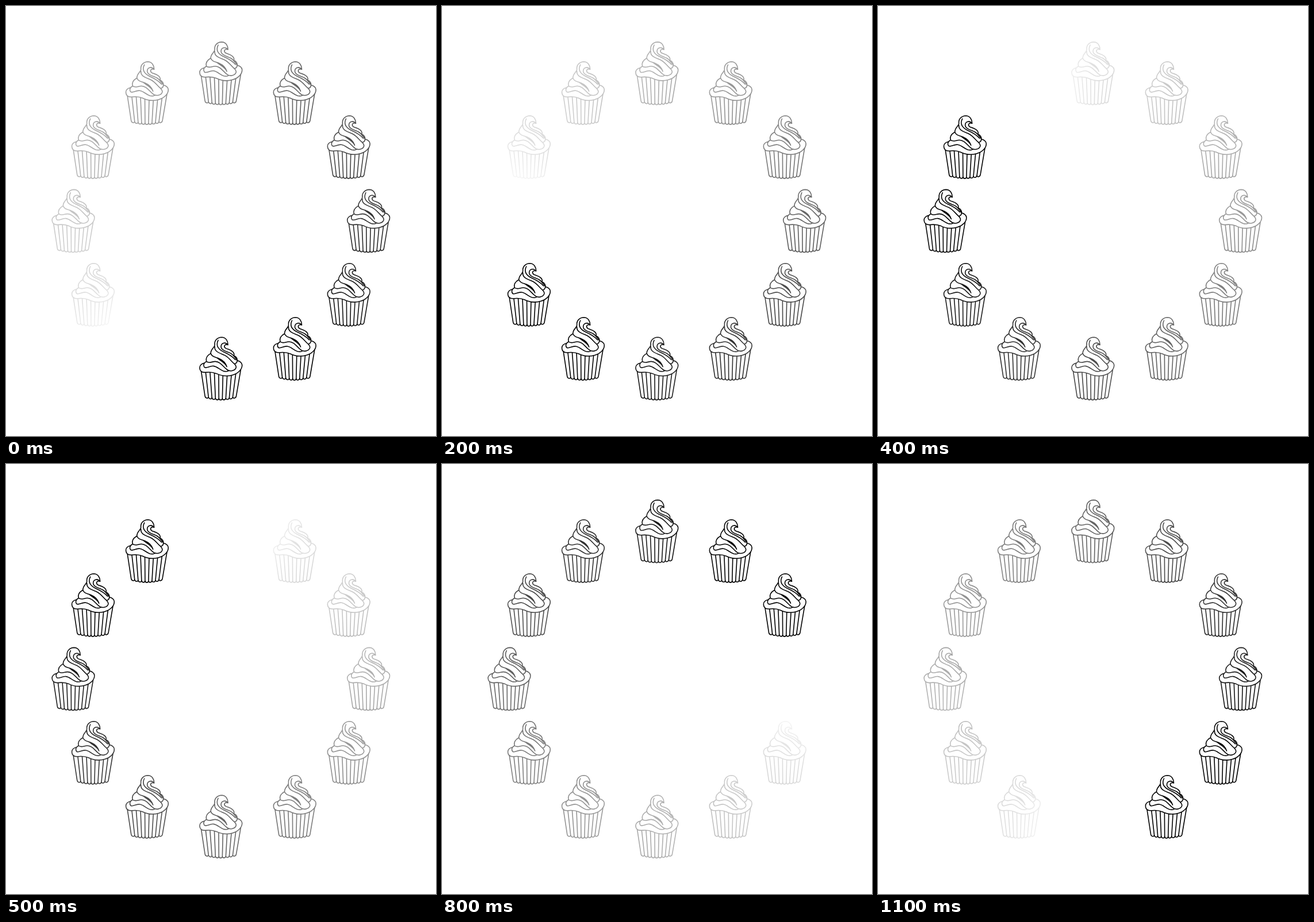
Animation of 748 by 748 pixels, one loop 1200 ms. Source, as an HTML page with a canvas:

```html
<!DOCTYPE html>
<html lang="en">
<head>
<meta charset="utf-8">
<title>Cupcake spinner</title>
<style>
  html, body { margin: 0; width: 100%; height: 100%; overflow: hidden; background: #fff; }
  canvas { display: block; }
</style>
</head>
<body>
<canvas id="stage" width="748" height="748"></canvas>
<script>
const ctx = document.getElementById('stage').getContext('2d');
const COUNT = 12, STEP_MS = 100, RADIUS = 256.8;
const CENTER = { x: 373.6, y: 373.6 };
const CAKE = { w: 75, h: 110 };

// Paper cup: slanted ribs joined by a scalloped hem.
function makeCup() {
  const cup = new Path2D(), ribs = 9;
  const hem = k => [10 + k * 6.05, 103 + 4 * Math.sin(Math.PI * k / ribs)];
  for (let k = 0; k <= ribs; k++) {
    const [x, y] = hem(k);
    cup.moveTo(3 + k * 7.7, 57);
    cup.lineTo(x, y);
    if (k < ribs) {
      const [nx, ny] = hem(k + 1);
      cup.bezierCurveTo(x + 0.5, y + 4, nx - 0.5, ny + 4, nx, ny);
    }
  }
  return cup;
}

const cup = makeCup();
const rim = new Path2D('M8 46C4 47 0.7 50 0.8 54C1 59 4 62 10 62C18 61 23 61 30 64C38 68 49 69 58 66.5C67 64 75 57 74.6 49C74.4 45 70 42 66 41.5');
const swirl = new Path2D([
  // silhouette: crest, left folds, right edge
  'M50 14C50 8 47 1 39 0.8C31 1 26 7 27 14C27 19 20 21 20 29C13 33 11 38 12.5 43C7 46 7 50 9 53',
  'M57 25C60 27 61 30 60.5 33C64 34 67 38 66 42C66 45 63 47 61 47',
  // curl at the tip
  'M50 14C45 8 38 11 38 17C38 24 50 26 55 29C60 32 63 37 66 41',
  'M50 14C44 12 42 17 46 20C50 22 54 22 57 25',
  // folds sweeping to the right
  'M33 6C28 16 34 22 42 26C51 30 58 34 63 40',
  'M27 17C26 26 35 28 44 32C52 36 55 42 61 47',
  'M20 29C23 36 29 35 35 38C42 41 46 46 48 52',
  'M12.5 43C17 47 22 43 28 43C36 43 41 51 47 56C53 62 62 59 64 54C65 51 63 49 61 47',
  'M9 53C13 56 18 50 25 51C32 52 36 58 43 60C48 61 50 60 51 59'
].join(''));
const shadow = new Path2D('M30 37C38 38 47 44 48.5 53C44 46 37 42 30 37Z');

// Ink fades around the ring behind the leading cupcake.
function ringInk(head, left, top) {
  const turn = 2 * Math.PI / COUNT;
  const ink = ctx.createConicGradient((head + 0.5) * turn - Math.PI / 2, CENTER.x - left, CENTER.y - top);
  const stop = (age, alpha) => {
    const v = Math.round(255 * (1 - alpha));
    ink.addColorStop((11.5 - age) / COUNT, `rgb(${v},${v},${v})`);
  };
  stop(11.5, 0);
  stop(10.6, 0);
  stop(10, 0.12);
  stop(1, 1);
  stop(-0.5, 1);
  return ink;
}

function drawCupcake(slot, head) {
  const angle = slot * 2 * Math.PI / COUNT;
  const left = CENTER.x + RADIUS * Math.sin(angle) - CAKE.w / 2;
  const top = CENTER.y - RADIUS * Math.cos(angle) - CAKE.h / 2;
  ctx.save();
  ctx.translate(left, top);
  ctx.strokeStyle = ringInk(head, left, top);
  ctx.stroke(cup);
  ctx.fillStyle = '#fff';
  ctx.fill(rim);
  ctx.stroke(rim);
  ctx.stroke(swirl);
  ctx.fillStyle = ctx.strokeStyle;
  ctx.fill(shadow);
  ctx.restore();
}

function render(ms) {
  const head = (6 + Math.floor(ms / STEP_MS)) % COUNT;
  ctx.fillStyle = '#fff';
  ctx.fillRect(0, 0, 748, 748);
  ctx.lineWidth = 1.6;
  ctx.lineCap = ctx.lineJoin = 'round';
  for (let age = 0; age < COUNT - 1; age++) {
    drawCupcake((head - age + COUNT) % COUNT, head);
  }
}

const start = performance.now();
function tick() {
  render((performance.now() - start) % (COUNT * STEP_MS));
  requestAnimationFrame(tick);
}
tick();
</script>
</body>
</html>
```
